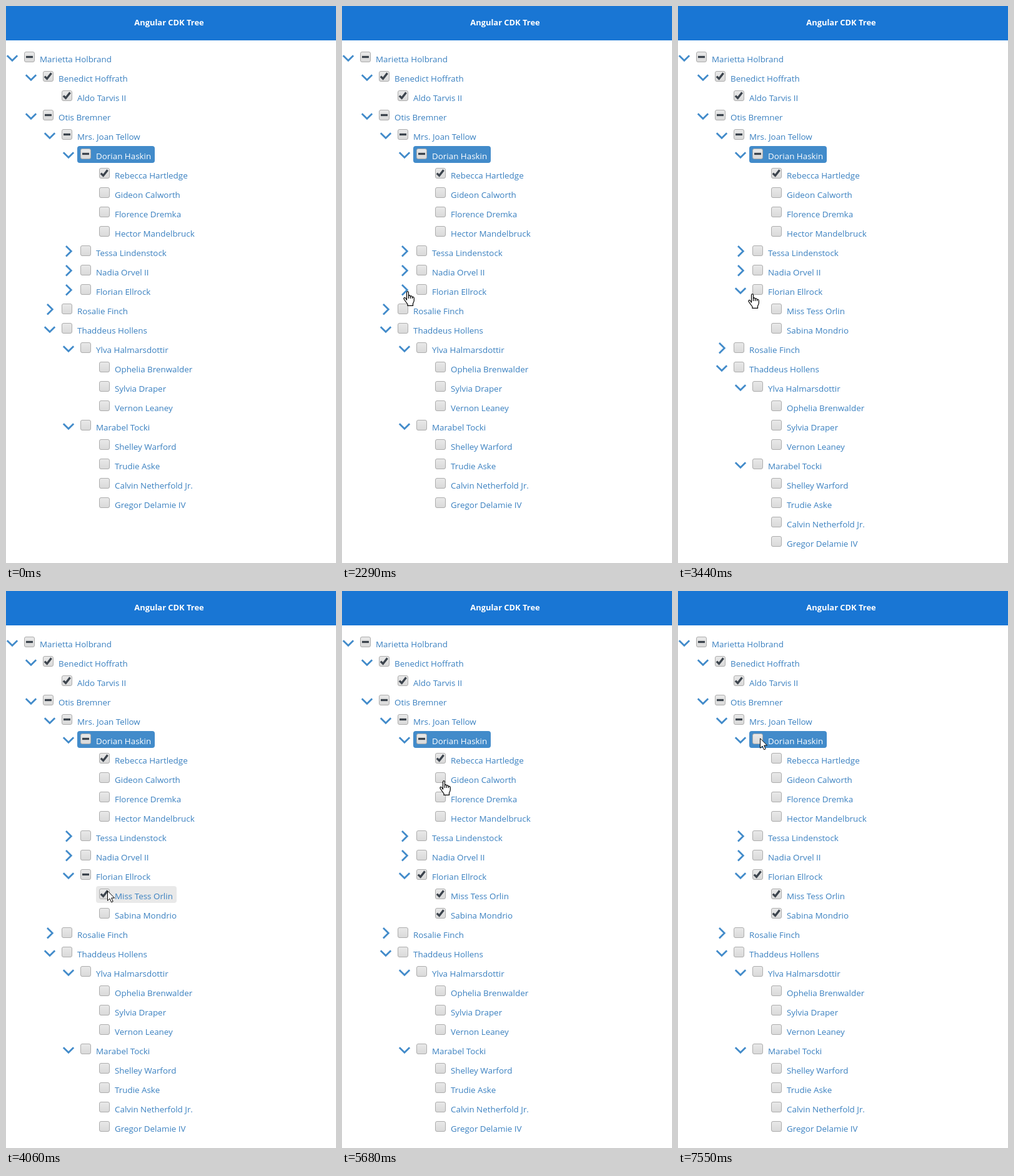
Animation of 528 by 891 pixels, one loop 8000 ms. Source, as an HTML page:

```html
<!DOCTYPE html>
<html lang="en">
<head>
<meta charset="utf-8">
<title>Angular CDK Tree</title>
<style>
html, body { margin: 0; width: 100%; height: 100%; overflow: hidden; background: #fff; }
body { position: relative; font: 13.4px "Open Sans", "Noto Sans", sans-serif; color: #3a80c0; }
header { height: 55px; background: #1976d4; }
h1 { margin: 0; width: 522px; font-size: 12.9px; font-weight: 700; line-height: 52px; text-align: center; color: #fff; }
.row { position: absolute; height: 27px; white-space: nowrap; }
.label { position: absolute; left: 24px; height: 27px; padding: 0 6px 0 30px; line-height: 32px; border-radius: 4px; }
.hover { background: #e9e9e9; }
.selected { background: #428bca; color: #fff; }
svg { position: absolute; overflow: visible; fill: none; }
.arrow { left: 0; top: 4px; stroke: #428bca; stroke-width: 2.8; }
.box { left: 29px; top: 4px; }
.mark { stroke: #3c444d; stroke-width: 3.3; }
#cursor { left: 0; top: 0; fill: #fff; stroke: #000; }
</style>
</head>
<body>
<header><h1>Angular CDK Tree</h1></header>
<main></main>
<svg id="cursor" width="18" height="24">
  <linearGradient id="shade" x2="0" y2="1"><stop stop-color="#e9e9e9"/><stop offset="1" stop-color="#d9d9d9"/></linearGradient>
  <path id="pointer" d="M.5 .8V16.3L4 13L6.6 18.8L9.2 17.7L6.7 12H11.6Z"/>
  <g id="hand" stroke-width="1.2">
    <path d="M-1.5 14.5V2.5Q-1.5 .6 0 .6T1.5 2.5V8Q3 5 4.5 8.5Q6.4 6.5 7.5 9.7Q10 8.5 10.3 11.5V15Q10.3 17 8.5 20V23.3H0V21Q-4 16-6.2 12.3Q-5.5 8.5-2.8 12Z"/>
    <path d="M1.5 7V12M4.5 8V12M7.5 9V12"/>
  </g>
</svg>
<script>
const LOOP = 8000, EXPAND = 2440, STEP = 75;
const BRANCH = 'Florian Ellrock', PICKED = 'Dorian Haskin', FIRST = 'Miss Tess Orlin', SECOND = 'Sabina Mondrio';

// Indent gives the depth; * is checked, + is collapsed
const outline = `Marietta Holbrand
 Benedict Hoffrath
  Aldo Tarvis II*
 Otis Bremner
  Mrs. Joan Tellow
   ${PICKED}
    Rebecca Hartledge*
    Gideon Calworth
    Florence Dremka
    Hector Mandelbruck
   Tessa Lindenstock+
   Nadia Orvel II+
   ${BRANCH}
    ${FIRST}
    ${SECOND}
  Rosalie Finch+
  Thaddeus Hollens
   Ylva Halmarsdottir
    Ophelia Brenwalder
    Sylvia Draper
    Vernon Leaney
   Marabel Tocki
    Shelley Warford
    Trudie Aske
    Calvin Netherfold Jr.
    Gregor Delamie IV`;

const clicks = [
  { at: 4060, name: FIRST, check: 'on' },
  { at: 4990, name: SECOND, check: 'on' },
  { at: 6300, name: PICKED, check: 'on' },
  { at: 7480, name: PICKED, check: 'off' }
];

// Cursor moves: start, end, place reached
const moves = [
  [0, 0, 431, 895],
  [190, 400, 360, 697],
  [560, 960, 434, 895],
  [1580, 2290, 105, 456],
  [2440, 2670, 108, 430],
  [2670, 2900, 108, 455],
  [3440, 4060, 162, 479],
  [4590, 4670, 161, 515],
  [4910, 5140, 164, 517],
  [5460, 5680, 163, 303],
  [5770, 6170, 131, 235]
];

const arrows = { open: 'M1.8 6.2L10 14.2L18.2 6.2', closed: 'M6 1L14.3 9.2L6 17.4', none: '' };
const marks = { on: 'M2.8 8.6L6.6 12.2L13.6 3.4', mixed: 'M3 8.5H14', off: '' };
const $ = id => document.getElementById(id);
const within = (t, a, b) => t >= a && t < b;

const lineage = [];
const nodes = outline.split('\n').map(line => {
  const depth = line.search(/\S/);
  const node = {
    name: line.replace(/[*+]/, '').trim(),
    initial: line.endsWith('*') ? 'on' : 'off',
    collapsed: line.endsWith('+'),
    parent: lineage[depth - 1],
    children: []
  };
  lineage[depth] = node;
  node.parent?.children.push(node);

  const el = node.el = document.createElement('div');
  el.className = 'row';
  el.style.left = depth * 30 + 'px';
  el.innerHTML = `<span class="label">${node.name}</span>
    <svg class="arrow" width="20" height="20"><path/></svg>
    <svg class="box" width="17" height="17">
      <rect x=".5" y=".5" width="16" height="16" rx="2.5" fill="url(#shade)" stroke="#adadad"/>
      <path class="mark"/>
    </svg>`;
  node.label = el.querySelector('.label');
  node.arrow = el.querySelector('.arrow path');
  node.mark = el.querySelector('.mark');
  document.querySelector('main').append(el);
  return node;
});

function checkOf(node, t) {
  if (node.children.length) {
    const states = new Set(node.children.map(child => checkOf(child, t)));
    return states.size === 1 ? [...states][0] : 'mixed';
  }
  const click = clicks.findLast(c => t >= c.at && [node.name, node.parent.name].includes(c.name));
  return click ? click.check : node.initial;
}

function arrowOf(node, t) {
  if (node.collapsed || node.name === BRANCH && t < EXPAND) return 'closed';
  return node.children.length ? 'open' : 'none';
}

function cursorAt(t) {
  const i = moves.findLastIndex(m => t >= m[0]);
  const [start, end, ...to] = moves[i];
  if (t >= end) return to;
  const u = (Math.floor((t - start) / STEP) + 1) * STEP / (end - start + STEP);
  const from = moves[i - 1].slice(2);
  return to.map((p, axis) => Math.round(from[axis] + (p - from[axis]) * u * (2 - u)));
}

function draw(t) {
  let y = 69;
  for (const node of nodes) {
    const hidden = node.parent && arrowOf(node.parent, t) === 'closed';
    node.el.hidden = hidden;
    if (hidden) continue;
    node.el.style.top = y + 'px';
    y += 31;
    node.mark.setAttribute('d', marks[checkOf(node, t)]);
    node.arrow.setAttribute('d', arrows[arrowOf(node, t)]);
    node.label.classList.toggle('selected', node.name === PICKED);
    node.label.classList.toggle('hover', node.name === FIRST && within(t, 3900, 5460));
  }

  const [x, top] = cursorAt(t);
  const hand = within(t, 2210, 3900) || within(t, 5530, 6100);
  $('cursor').style.transform = `translate(${x}px, ${top}px)`;
  $('hand').style.display = hand ? '' : 'none';
  $('pointer').style.display = hand ? 'none' : '';
}

const began = performance.now();
function tick() {
  draw((performance.now() - began) % LOOP);
  requestAnimationFrame(tick);
}
tick();
</script>
</body>
</html>
```
